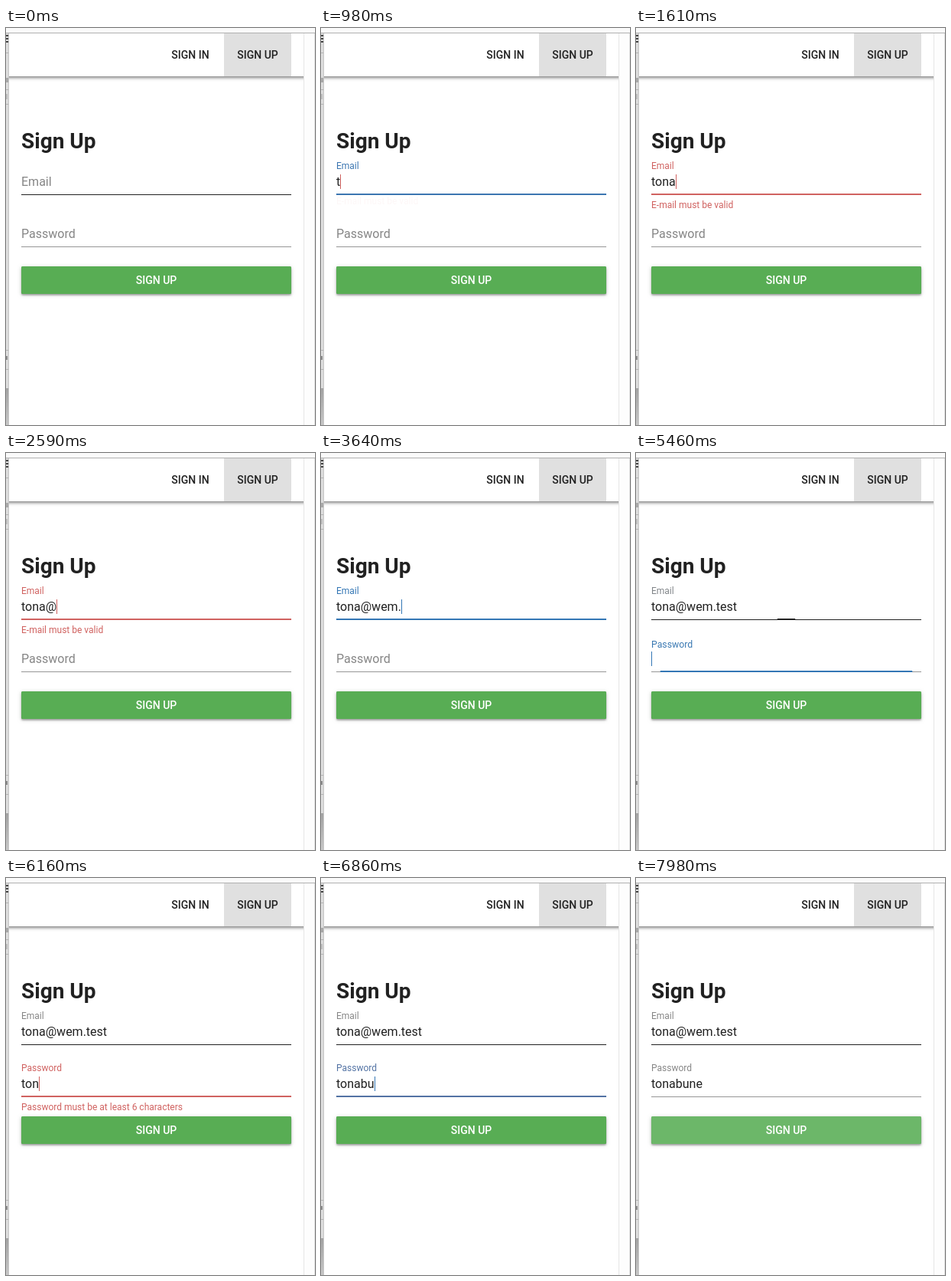
These frames come from a looping animation (404x518 px, 8 s). An HTML page with a canvas:

```html
<!DOCTYPE html>
<html lang="en">
<head>
<meta charset="utf-8">
<title>Sign Up form</title>
<style>
  html, body { margin: 0; width: 100%; height: 100%; overflow: hidden; background: #fff; }
  canvas { display: block; }
</style>
</head>
<body>
<canvas id="stage" width="404" height="518"></canvas>
<script>
const ctx = document.getElementById('stage').getContext('2d');
const LOOP = 8000, STEP = 70, FADE = 300;
const LEFT = 20, WIDTH = 353;
const INK = [33, 33, 33], GRAY = [134, 134, 134];
const BLUE = [52, 119, 181], RED = [208, 98, 96];

const fields = [
  {
    y: 217, label: 'Email', text: 'tona@wem.test', line: INK,
    focus: 205, blur: 5278, bad: [975, 3060], error: 'E-mail must be valid',
    keys: [910, 1120, 1330, 1540, 2450, 3010, 3150, 3430, 3600, 3850, 4060, 4200, 4270]
  },
  {
    y: 285, label: 'Password', text: 'tonabune', line: [150, 150, 150],
    focus: 5278, blur: 7355, bad: [5800, 6738], error: 'Password must be at least 6 characters',
    keys: [5740, 5950, 6160, 6370, 6540, 6680, 6940, 7080]
  }
];

const rgb = c => `rgb(${c.map(Math.round).join(',')})`;
const mix = (a, b, p) => a.map((v, i) => v + (b[i] - v) * p);
const clamp = v => Math.min(1, Math.max(0, v));

// cubic-bezier(.25, .8, .5, 1)
function ease(x) {
  if (x <= 0 || x >= 1) return clamp(x);
  const curve = (s, a, b) => 3 * (1 - s) ** 2 * s * a + 3 * (1 - s) * s * s * b + s ** 3;
  let lo = 0, hi = 1;
  for (let i = 0; i < 24; i++) {
    const mid = (lo + hi) / 2;
    if (curve(mid, .25, .5) < x) lo = mid; else hi = mid;
  }
  return curve(lo, .8, 1);
}

const since = (t, start) => ease((t - start) / FADE);

function box(x, y, w, h, color) {
  ctx.fillStyle = color;
  ctx.fillRect(x, y, w, h);
}

function write(str, x, y, font, color, align = 'left') {
  ctx.font = `${font} Roboto, sans-serif`;
  ctx.textAlign = align;
  ctx.fillStyle = color;
  ctx.fillText(str, x, y);
}

function shadow(color, y, blur) {
  ctx.shadowColor = color;
  ctx.shadowOffsetY = y;
  ctx.shadowBlur = blur;
}

function drawWindow() {
  box(0, 0, 404, 518, '#fff');
  // sliver of the window behind
  box(0, 7, 4, 463, '#dcdcdc');
  for (const y of [9, 13, 17]) box(0, y, 4, 2, '#444');
  for (const y of [32, 80, 99, 420, 445]) box(0, y, 4, 1, '#b4b4b4');
  box(0, 65, 3, 6, '#a8a8a8');
  box(0, 86, 2, 7, '#bcbcbc');
  box(0, 428, 2, 5, '#888');
  const floor = ctx.createLinearGradient(0, 470, 0, 518);
  floor.addColorStop(0, '#a2a2a2');
  floor.addColorStop(1, '#c6c6c6');
  box(0, 470, 4, 48, floor);
  box(3, 7, 1, 511, '#c4c4c4');

  box(0, 0, 404, 6, '#fafafa');
  box(0, 6, 404, 1, '#b0b0b0');

  ctx.save();
  ctx.beginPath();
  ctx.rect(4, 7, 385, 70);
  ctx.clip();
  shadow('rgba(0,0,0,.5)', 2, 4);
  box(-6, 7, 405, 56, '#fff');
  ctx.restore();
  box(389, 7, 1, 511, '#e6e6e6');
  box(390, 7, 13, 511, '#fdfdfd');
  box(403, 7, 1, 511, '#dedede');

  box(285, 7, 88, 56, '#e0e0e0');
  write('SIGN IN', 241, 40, '500 14px', rgb(INK), 'center');
  write('SIGN UP', 329, 40, '500 14px', rgb(INK), 'center');
  write('Sign Up', LEFT, 157, 'bold 28px', rgb(INK));
}

function drawField(f, t) {
  const active = t >= f.focus && t < f.blur;
  const open = since(t, f.focus) - since(t, f.blur);
  const wrong = since(t, f.bad[0]) - since(t, f.bad[1]);
  const tone = mix(BLUE, RED, wrong);
  const base = f.y - 11;

  // the label stays raised once the field holds text
  const lift = since(t, f.focus);
  const scale = 1 - .25 * lift;
  ctx.save();
  ctx.translate(LEFT, base - 15.5 - 18 * lift);
  ctx.scale(scale, scale);
  write(f.label, 0, 15.5, '16px', rgb(mix(GRAY, tone, open)));
  ctx.restore();

  const typed = f.keys.filter(k => k <= t);
  const value = f.text.slice(0, typed.length);
  write(value, LEFT, base, '16px', rgb(INK));
  if (active) {
    const last = Math.max(f.focus, ...typed);
    const inError = t >= f.bad[0] && t < f.bad[1];
    if ((t - last) % 1000 < 500) {
      const x = LEFT + Math.round(ctx.measureText(value).width);
      box(x, base - 15, 1, 19, rgb(inError ? RED : BLUE));
    }
  }

  box(LEFT, f.y, WIDTH, 1, rgb(f.line));
  const bar = WIDTH * open;
  if (bar > 0) box(LEFT + (WIDTH - bar) / 2, f.y - 1, bar, 2, rgb(active ? tone : INK));

  const shown = since(t, f.bad[0]) * (1 - clamp((t - f.bad[1]) / 110));
  if (shown > 0) {
    ctx.globalAlpha = shown;
    write(f.error, LEFT, f.y + 18 - 5 * (1 - shown), '12px', rgb(RED));
    ctx.globalAlpha = 1;
  }
}

function drawButton(t) {
  const glow = .12 * since(t, fields[1].blur);
  ctx.save();
  ctx.beginPath();
  ctx.roundRect(LEFT, 311, WIDTH, 36, 2);
  ctx.fillStyle = rgb(mix([88, 173, 84], [255, 255, 255], glow));
  shadow('rgba(0,0,0,.2)', 1, 5);
  ctx.fill();
  shadow('rgba(0,0,0,.25)', 2, 2);
  ctx.fill();
  ctx.restore();
  write('SIGN UP', LEFT + WIDTH / 2, 334, '500 14px', '#fff', 'center');
}

const start = performance.now();
function frame() {
  const now = (performance.now() - start) % LOOP;
  const t = Math.floor(now / STEP) * STEP;
  drawWindow();
  for (const f of fields) drawField(f, t);
  drawButton(t);
  requestAnimationFrame(frame);
}
frame();
</script>
</body>
</html>
```
